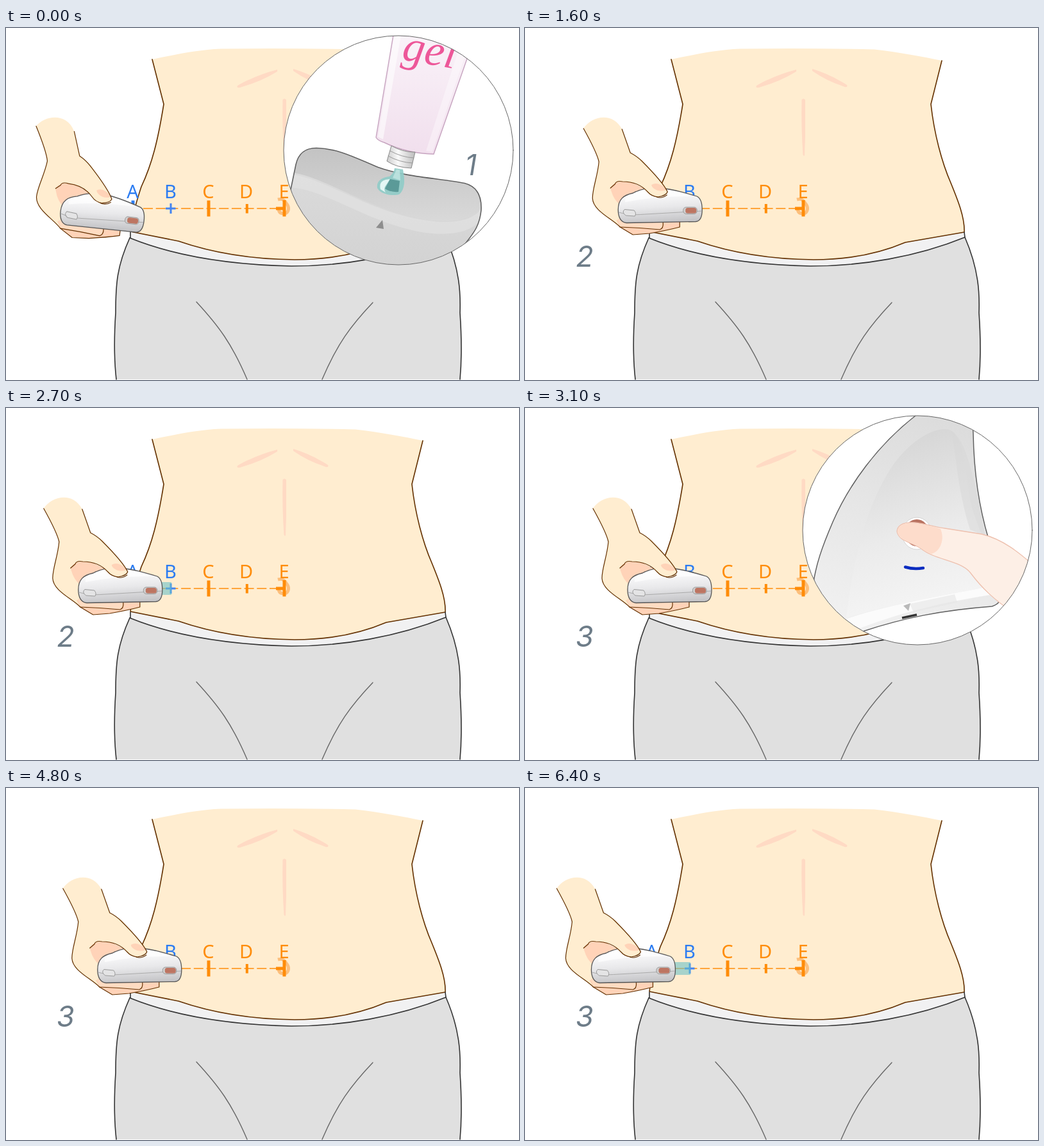
These frames come from a looping animation (800 px wide and 550 px high, 6.5 s). An HTML page:

```html
<!DOCTYPE html>
<html lang="en">
<head>
<meta charset="utf-8">
<title>Gel and device guide</title>
<style>
  html, body { margin: 0; width: 100%; height: 100%; overflow: hidden; background: #fff; }
  svg { display: block; width: 800px; height: 550px; }
  .line { fill: none; stroke-linecap: round; stroke-linejoin: round; }
  .brown { stroke: #633000; }
  .dark { stroke: #333; }
  .label { font: 29px "Noto Sans", "Open Sans", sans-serif; text-anchor: middle; }
  .num { font: italic 400 45px Inter, Roboto, sans-serif; text-anchor: middle; fill: #6d7c88; }
</style>
</head>
<body>
<svg viewBox="0 0 800 550">
  <defs>
    <clipPath id="lens"><circle cx="612" cy="191" r="179"/></clipPath>
    <linearGradient id="shell" x1="0.4" y1="0" x2="0.55" y2="1">
      <stop offset="0.15" stop-color="#fbfbfc"/><stop offset="0.55" stop-color="#e8e8ea"/><stop offset="1" stop-color="#c2c2c5"/>
    </linearGradient>
    <linearGradient id="headTop" x1="0" y1="0" x2="0" y2="1">
      <stop offset="0" stop-color="#c3c3c3"/><stop offset="1" stop-color="#d9d9d9"/>
    </linearGradient>
    <linearGradient id="headFront" x1="0" y1="0" x2="0" y2="1">
      <stop offset="0.2" stop-color="#dadada"/><stop offset="0.85" stop-color="#d3d3d3"/>
    </linearGradient>
    <linearGradient id="tube" x1="0" y1="0" x2="0" y2="1">
      <stop offset="0" stop-color="#faf3f9"/><stop offset="1" stop-color="#f1dfed"/>
    </linearGradient>
    <linearGradient id="cap">
      <stop offset="0" stop-color="#cccccc"/><stop offset="0.4" stop-color="#fafafa"/><stop offset="1" stop-color="#bcbcbc"/>
    </linearGradient>
    <linearGradient id="face" x1="0.4" y1="0" x2="0.6" y2="1">
      <stop offset="0" stop-color="#d5d5d5"/><stop offset="0.55" stop-color="#ebebeb"/><stop offset="1" stop-color="#f6f6f6"/>
    </linearGradient>
    <linearGradient id="side" x1="0.6" y1="0" x2="0.3" y2="1">
      <stop offset="0" stop-color="#dcdcdc"/><stop offset="0.6" stop-color="#eaeaea"/><stop offset="1" stop-color="#f4f4f4"/>
    </linearGradient>
  </defs>

  <g id="body">
    <path fill="#ffedd0" d="M228 49C262 42 298 34 335 32.5Q440 31 545 33.5C585 38 620 45 650 51L633 119C638 165 650 210 664 242C675 269 686 296 685 319L593 335Q530 362 450 362Q350 361 269 333L194 318C196 300 203 272 211 248C228 212 237 175 246 119Z"/>
    <path fill="#f1f1f2" d="M194 318L269 333Q350 361 450 362Q530 362 593 335L685 319L686 327C610 358 525 372 445 372C350 370 262 356 193 328Z"/>
    <path fill="#e0e0e0" d="M193 328C262 356 350 370 445 372C525 372 610 358 686 327C708 378 709 415 708 445Q712 505 708 549H172Q167 505 171 445C171 400 173 372 193 328Z"/>
    <path class="line brown" stroke-width="1.6" d="M228 49L246 119C237 175 228 212 211 248C203 272 196 300 194 318L269 333Q350 361 450 362Q530 362 593 335L685 319C686 296 675 269 664 242C650 210 638 165 633 119L650 51"/>
    <g class="line dark" stroke-width="1.6">
      <path d="M194 319V328M685 319L686 327M193 328C262 356 350 370 445 372C525 372 610 358 686 327"/>
      <path d="M172 549Q167 505 171 445C171 400 173 372 193 328M686 327C708 378 709 415 708 445Q712 505 708 549"/>
    </g>
    <path class="line" stroke="#666" stroke-width="1.4" d="M297 428C332 466 352 493 376 549M572 429C537 466 517 493 493 549"/>
    <g fill="#ffdac4">
      <path d="M423 65C400 71 374 82 361 90C359 94 363 94 368 92Q399 83 423 68Z"/>
      <path d="M448 64C467 69 490 81 502 89C504 93 500 93 496 91Q469 82 448 67Z"/>
      <path d="M431.500 112Q434 109 437 112L437 170L436 199Q434.500 201 433.500 198Q430.500 155 431.500 112Z"/>
    </g>
  </g>

  <g id="marks" fill="none">
    <path stroke="#fcbf7c" stroke-width="5" d="M424 268C434 265 436 273 438 275C443 282 440 290 433 290C427 290 425 286 425 281"/>
    <path stroke="#ffa43a" stroke-width="2" stroke-dasharray="15 4.7" d="M214 282H434"/>
    <path stroke="#2b7cf2" stroke-width="5" d="M198 269.500V294.500"/>
    <path stroke="#4484f0" stroke-width="3" d="M257 274V290M249 282H264.500"/>
    <path stroke="#ff8c08" stroke-width="5" d="M316 269.500V294.500M434 269V294.500M421 282H434"/>
    <path stroke="#ff8c08" stroke-width="4" d="M375.800 275V289.500"/>
  </g>
  <g id="labels"></g>
  <rect id="gel" x="200" y="272" width="58" height="20" fill="#68c2c8" opacity="0"/>

  <g id="hand">
    <path fill="#ffedd0" d="M47 157C59 138 92 130 107 158L120 195L140 209L120 250L110 300L104 311C92 298 62 286 61 266C61 250 69 232 71 209C68 195 57 175 47 157Z"/>
    <path fill="#ffd3b8" d="M89 250C94 239 106 239 124 242L150 255L140 272L104 276Q93 268 89 250Z"/>
    <path fill="#ffd3b8" d="M98 300L104 311L124 323L150 321Q178 316 197 311V300Z"/>
    <path fill="#ffdcc2" d="M100 298L105 311Q135 312 166 315Q172 313 171 301Z"/>
    <g class="line brown" stroke-width="1.2">
      <path d="M47 157C57 175 68 195 71 209C69 232 61 250 61 266C62 286 92 298 104 311L124 323L150 321Q178 316 197 311V303"/>
      <path d="M104 311Q135 312 166 315Q172 313 171 304"/>
    </g>
    <path fill="url(#shell)" stroke="#555" stroke-width="1.300" d="M101 284C101 268 109 261 124 258Q140 249 165 250Q185 251 224 263C230 266 232 276 232 284C232 296 228 302 222 302.500L114 304.500C105 304 101 295 101 284Z"/>
    <path fill="#fff" opacity=".7" d="M112 266Q132 252 165 252Q190 254 215 263Q160 262 112 272Z"/>
    <path class="line" stroke="#aaa" d="M102 288Q118 293 135 291.500L231 286"/>
    <path fill="#e4e4e5" stroke="#999" d="M111 283.500L126 285Q130 290 127 294L113 293Q106 288 111 283.500Z"/>
    <rect x="202.500" y="280" width="21.500" height="10.500" rx="4.500" fill="#cfcfcf" stroke="#999"/>
    <rect x="206" y="281" width="17" height="8.500" rx="3.500" fill="#bd7562"/>
    <path fill="#ffedd0" d="M92 243Q98 239 108 240C126 240 138 246 147 256Q153 263 163 264Q176 262 178 256C172 243 154 224 139 207L118 194L88 220Z"/>
    <path fill="#ffd3b8" d="M153 245Q160 241 167 245Q175 249 176 253Q165 257 157 251Q153 248 153 245Z"/>
    <path class="line brown" stroke-width="1.2" d="M107 158L120 195Q130 200 138 208C154 224 172 243 178 256Q176 262 163 264Q153 263 147 256C138 246 126 240 108 240Q98 238 96 244L89 250"/>
    <path class="line brown" stroke-width="1.2" d="M161 264Q169 267 177 261"/>
  </g>

  <text class="num" id="step" x="93" y="373"></text>

  <g id="lensGel">
    <circle cx="612" cy="191" r="179" fill="#fff"/>
    <g clip-path="url(#lens)">
      <g transform="translate(0 1.5)">
        <path fill="url(#headFront)" d="M440 270L452 212C456 194 467 186 484 186C520 187 548 203 580 216C620 231 680 234 715 241C735 246 742 262 741 283C738 315 722 325 712 342L690 400H430Z"/>
        <path fill="url(#headTop)" d="M450 225C454 196 466 187 484 187C520 188 548 204 580 217C620 232 680 235 715 242C734 247 741 262 740 279C727 300 690 304 655 298C570 285 505 235 450 225Z"/>
        <path fill="#e4e4e4" opacity=".6" d="M450 228C505 238 570 287 655 299C690 305 727 301 740 282L739 299C722 322 680 323 645 317C560 300 500 252 447 248Z"/>
        <path class="line" stroke="#606060" stroke-width="1.600" d="M440 270L452 212C456 194 467 186 484 186C520 187 548 203 580 216C620 231 680 234 715 241C735 246 742 262 741 283C738 315 722 325 712 342"/>
      </g>
      <path fill="#8d8d8d" d="M587 300L577 312L589 314Z"/>
      <path fill="url(#tube)" stroke="#c6a3bf" stroke-width="1.400" d="M605 5L577 171Q580 176 590 179Q625 196 667 197L734 5Z"/>
      <path fill="#fff" opacity=".6" d="M607 5L580 170L588 174L617 5Z"/>
      <path fill="#fff" opacity=".35" d="M715 5L655 192L665 194L729 5Z"/>
      <text transform="translate(616 49) rotate(10)" font-family="'Liberation Serif', 'Noto Serif', serif" font-style="italic" font-size="69" fill="#ed5799">gel</text>
      <path fill="url(#cap)" stroke="#888" d="M601 184Q618 194 638 194L632 219Q609 218 594 208Z"/>
      <path class="line" stroke="#999" d="M599 192Q617 202 636 203M596 200Q614 210 634 211"/>
      <g transform="translate(0 2)">
        <path fill="#8fccc8" opacity=".9" d="M606 217L619 219C622 234 623 250 613 258C603 261 584 258 579 248C577 237 587 231 598 230Q605 225 606 217Z"/>
        <path fill="#e3f6f4" d="M584 250Q581 238 592 235L599 234L591 246Q589 251 592 255Z"/>
        <path fill="#5b9a98" d="M599 234L614 237L612 254Q600 255 591 249Z"/>
        <path fill="#c4e6e3" opacity=".8" d="M609 219L614 220L615 236L603 232Z"/>
      </g>
      <text class="num" x="725" y="230">1</text>
    </g>
    <circle class="line" cx="612" cy="191" r="179" stroke="#666"/>
  </g>

  <g id="lensPress">
    <circle cx="612" cy="191" r="179" fill="#fff"/>
    <g clip-path="url(#lens)">
      <path fill="url(#side)" stroke="#606060" stroke-width="1.500" d="M618 5L609 12C550 58 505 120 480 178C462 220 454 245 450 272L440 400L527 349C590 328 650 316 728 310Q744 305 741 291C738 265 731 237 723 205C708 155 700 100 699 40L697 5Z"/>
      <path fill="url(#face)" d="M662 34C640 28 600 50 570 95C535 150 512 230 501 328C560 308 660 292 738 276C725 230 712 200 700 165C685 120 690 45 662 34Z"/>
      <path fill="#d8d8d8" opacity=".5" d="M664 36C685 44 700 100 718 200L694 190C672 120 672 60 664 36Z"/>
      <path fill="#fbfbfb" d="M500 330C560 308 660 292 738 276L740 290C655 302 585 320 520 345Z"/>
      <path fill="#e6e6e6" opacity=".6" d="M600 306L670 291L674 304L606 319Z"/>
      <path fill="#b9b9b9" d="M590 309L601 305L598 317Z"/>
      <path fill="none" stroke="#333" stroke-width="3.500" d="M588 328L611 323"/>
      <ellipse cx="611" cy="196" rx="23" ry="25" fill="#fff" stroke="#d4d4d4"/>
      <ellipse cx="611" cy="195" rx="19" ry="21" fill="#b97361"/>
      <path class="line" stroke="#0a2cc0" stroke-width="4.500" d="M593 248.500Q606 252.500 621 250"/>
      <path fill="#fdefe6" stroke="#eec0ae" stroke-width="1.300" d="M580 193C581 181 592 178 608 179C625 181 640 186 655 188L712 197C745 205 770 225 800 252L770 325C730 300 710 278 695 258C680 238 640 238 618 220C603 209 583 209 580 193Z"/>
      <path fill="#fddccb" d="M581 193C582 182 592 179 608 180C625 182 640 186 648 189C655 205 648 224 634 228Q625 225 618 219C603 208 584 208 581 193Z"/>
    </g>
    <circle class="line" cx="612" cy="191" r="179" stroke="#666"/>
  </g>
</svg>
<script>
  const $ = id => document.getElementById(id);
  const LOOP = 6500, TICK = 100, REACH = 59, TILT = 7;

  $("labels").innerHTML = [..."ABCDE"].map((c, i) =>
    `<text class="label" x="${197.5 + i * 59}" y="266" fill="${i < 2 ? "#2b7cf2" : "#ff8c08"}">${c}</text>`).join("");

  // Each track is a list of [time, value] points.
  const slide = [[1100, 0], [1400, REACH], [2200, 0], [2600, 0], [3100, REACH], [4100, REACH], [6500, 0]];
  const tilt = [[700, TILT], [1100, 0]];
  const gelFade = [[1400, 0], [2200, 0.58]];

  function at(track, t) {
    if (t <= track[0][0]) return track[0][1];
    for (let i = 1; i < track.length; i++) {
      const [t0, a] = track[i - 1], [t1, b] = track[i];
      if (t <= t1) return a + (b - a) * (t - t0) / (t1 - t0);
    }
    return track[track.length - 1][1];
  }

  const show = (id, on) => $(id).setAttribute("visibility", on ? "visible" : "hidden");

  function draw(now) {
    const t = Math.floor(now % LOOP / TICK) * TICK;
    $("hand").setAttribute("transform", `translate(${at(slide, t)} 0) rotate(${at(tilt, t)} 77 155)`);
    $("gel").setAttribute("opacity", at(gelFade, t));
    $("step").textContent = t < 1400 ? "" : t < 3100 ? "2" : "3";
    show("lensGel", t < 800);
    show("lensPress", t >= 3100 && t < 4100);
  }

  const start = performance.now();
  function loop() {
    draw(performance.now() - start);
    requestAnimationFrame(loop);
  }
  loop();
</script>
</body>
</html>
```
